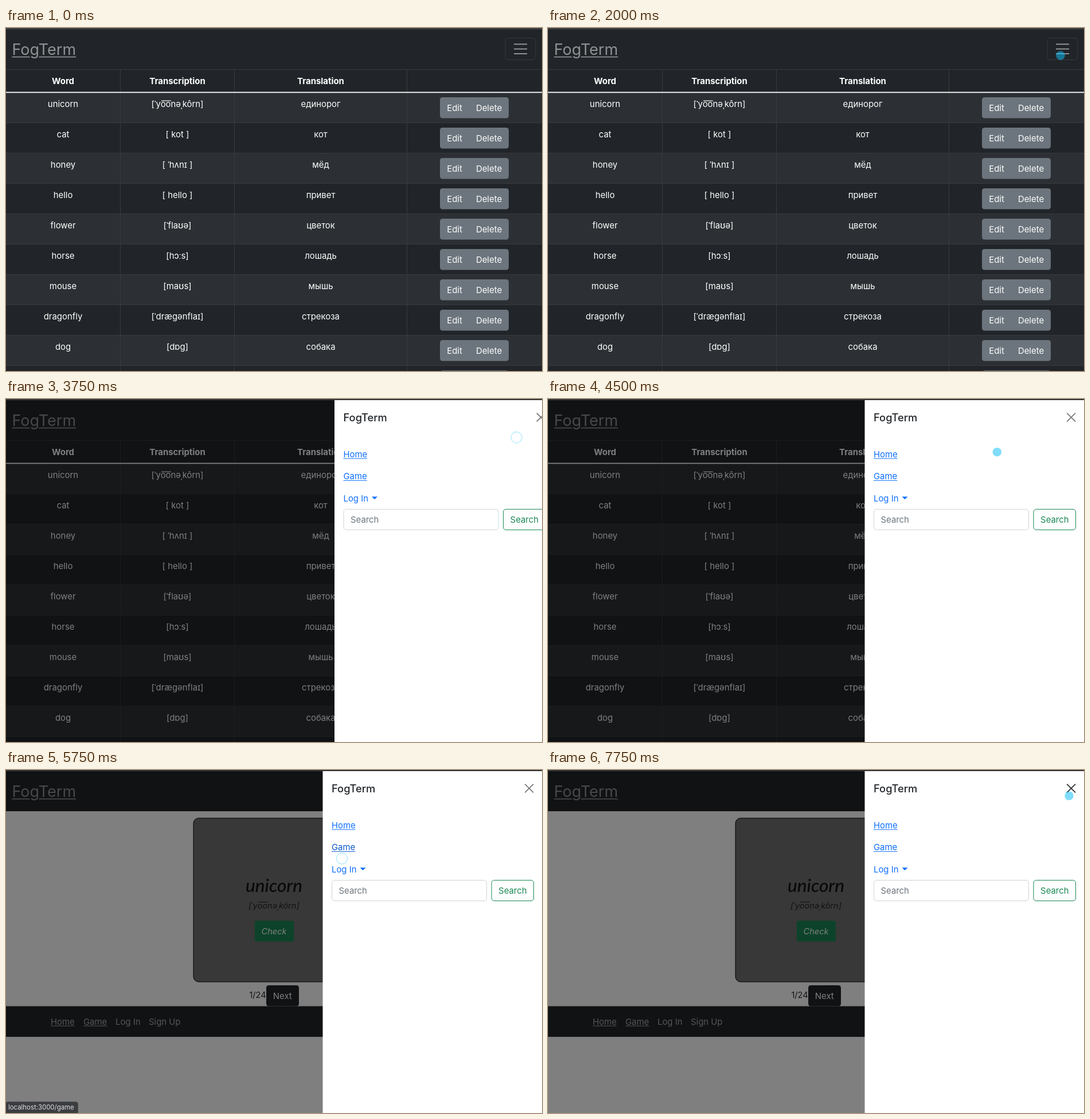
Write an HTML page with a canvas that moves like this. It is 935 px wide and 599 px high and loops after 8 s.

```html
<!DOCTYPE html>
<html lang="en">
<head>
<meta charset="utf-8">
<title>Word cards</title>
<style>
html, body { margin: 0; width: 100%; height: 100%; overflow: hidden; background: #212529; }
canvas { display: block; }
</style>
</head>
<body>
<canvas id="stage" width="935" height="599"></canvas>
<script>
const ctx = document.getElementById('stage').getContext('2d');
const W = 935, H = 599, LOOP = 8000, STEP = 250;
const SANS = 'Inter, "Noto Sans", "DejaVu Sans", sans-serif';
const BODY = '14.9px ' + SANS;
const BRAND = 'FogTerm';
const DARK = '#212529', LINE = '#373b3e', BLUE = '#0d6efd', GREEN = '#198754';
const DOT = 'rgba(13,190,247,.53)';
const PANEL_X = 552.5;

const words = [
  ['unicorn', '[ˈyoonəˌkôrn]', 'единорог'],
  ['cat', '[ kot ]', 'кот'],
  ['honey', '[ ˈhʌnɪ ]', 'мёд'],
  ['hello', '[ hello ]', 'привет'],
  ['flower', '[ˈflaʊə]', 'цветок'],
  ['horse', '[hɔːs]', 'лошадь'],
  ['mouse', '[maʊs]', 'мышь'],
  ['dragonfly', '[ˈdrægənflaɪ]', 'стрекоза'],
  ['dog', '[dɒg]', 'собака'],
  ['', '', '']
];
const centers = [99.5, 299, 549];

// Pointer path: time, x, y
const path = [
  [250, 848, 58], [750, 783, 211], [1000, 783, 180], [1250, 783, 180],
  [1750, 893, 44], [2000, 894, 48], [4000, 894, 48], [4250, 894, 64],
  [5000, 562, 150], [5250, 590, 135], [6500, 590, 135],
  [7500, 920, 42], [7750, 909, 45]
];
// Click rings: start, end, x, y, first opacity, last opacity
const rings = [
  [3250, 4250, 890.5, 67, .4, .12],
  [5750, 6500, 586, 154.5, .28, .1]
];

function rect(x, y, w, h, color) {
  ctx.fillStyle = color;
  ctx.fillRect(x, y, w, h);
}

function box(x, y, w, h, r, fill, stroke) {
  ctx.beginPath();
  ctx.roundRect(x, y, w, h, r);
  if (fill) { ctx.fillStyle = fill; ctx.fill(); }
  if (stroke) { ctx.strokeStyle = stroke; ctx.lineWidth = 1; ctx.stroke(); }
}

function text(s, x, y, color, font = BODY, align = 'left') {
  ctx.font = font;
  ctx.textAlign = align;
  ctx.fillStyle = color;
  ctx.fillText(s, x, y);
}

function link(s, x, y, color) {
  text(s, x, y, color);
  rect(x, y + 1.5, ctx.measureText(s).width, 1, color);
}

function strokePath(points, color, width) {
  ctx.beginPath();
  points.forEach(([x, y, move]) => move ? ctx.moveTo(x, y) : ctx.lineTo(x, y));
  ctx.strokeStyle = color;
  ctx.lineWidth = width;
  ctx.stroke();
}

// Transcription with the long bar over "oo"
function barred(s, x, y, color, font) {
  text(s, x, y, color, font, 'center');
  const at = s.indexOf('oo');
  if (at < 0) return;
  const left = x - ctx.measureText(s).width / 2 + ctx.measureText(s.slice(0, at)).width;
  rect(left + 1, y - 11.5, ctx.measureText('oo').width - 1, 1.2, color);
}

function navbar() {
  const color = '#8f9193';
  rect(0, 0, W, 72, DARK);
  ctx.font = '27px ' + SANS;
  ctx.textAlign = 'left';
  rect(10.5, 49.7, ctx.measureText(BRAND).width, 1.7, color);
  ctx.strokeStyle = DARK;
  ctx.lineWidth = 4;
  ctx.strokeText(BRAND, 10.5, 47);
  text(BRAND, 10.5, 47, color, ctx.font);
  box(871, 17.5, 53, 38, 5, null, LINE);
  for (const y of [28.3, 36.6, 44.9]) rect(886, y - .9, 23, 1.8, '#9b9d9f');
}

function tablePage() {
  rect(0, 0, W, H, DARK);
  navbar();
  rect(0, 72, W, 1, LINE);
  ['Word', 'Transcription', 'Translation'].forEach((s, i) =>
    text(s, centers[i], 98, '#fff', 'bold ' + BODY, 'center'));
  words.forEach((row, k) => {
    const y = 113 + 53 * k;
    if (k % 2 === 0) rect(0, y, W, 53, '#2c3034');
    rect(0, y + 52, W, 1, LINE);
    text(row[0], centers[0], y + 25, '#fff', BODY, 'center');
    barred(row[1], centers[1], y + 25, '#fff', BODY);
    text(row[2], centers[2], y + 25, '#fff', BODY, 'center');
    box(757, y + 8, 120, 36.5, 4.5, '#6c757d');
    text('Edit', 782.5, y + 32, '#fff', BODY, 'center');
    text('Delete', 842.5, y + 32, '#fff', BODY, 'center');
  });
  for (const x of [199, 398, 699]) rect(x, 72, 1, H, LINE);
  rect(0, 111.5, W, 1.8, '#fff');
}

function gamePage() {
  const soft = 'rgba(255,255,255,.62)';
  rect(0, 0, W, H, '#fff');
  navbar();
  box(327, 84, 281, 286, 9, '#707070', '#000');
  text('unicorn', 467.5, 213, '#111', 'italic 500 31.5px Lato, ' + SANS, 'center');
  barred(words[0][1], 467.5, 241.5, '#212529', 'italic 14.6px ' + SANS);
  box(434, 263.5, 68, 36, 2, GREEN);
  text('Check', 467.5, 287, '#fff', 'italic 14.6px ' + SANS, 'center');
  text('1/24', 453.5, 398, DARK, '14.5px ' + SANS, 'right');
  box(454, 376, 57, 36.5, 4.5, DARK);
  text('Next', 482.3, 400, '#fff', BODY, 'center');
  rect(0, 412.5, W, 53.5, DARK);
  link('Home', 78, 445, soft);
  link('Game', 135, 445, soft);
  text('Log In', 191, 445, soft);
  text('Sign Up', 249, 445, soft);
}

function panel(x, overGame, overClose) {
  ctx.save();
  ctx.translate(x - PANEL_X, 0);
  rect(PANEL_X, 2, 420, H, '#fff');
  text(BRAND, 568, 38.5, DARK, '500 18.3px ' + SANS);
  strokePath([[905.2, 24.6, 1], [920, 39.4], [920, 24.6, 1], [905.2, 39.4]],
    overClose ? '#333' : '#7c7c7c', 1.9);
  link('Home', 568, 102, BLUE);
  link('Game', 568, 140.3, overGame ? '#0a58ca' : BLUE);
  text('Log In', 568, 179, BLUE);
  ctx.beginPath();
  ctx.moveTo(617.5, 170.5);
  ctx.lineTo(627.5, 170.5);
  ctx.lineTo(622.5, 175.3);
  ctx.fillStyle = BLUE;
  ctx.fill();
  box(568.5, 192.5, 270, 36, 4.5, '#fff', '#ced4da');
  text('Search', 580.5, 216.3, '#6c757d');
  box(847, 192.5, 73.5, 36, 4.5, '#fff', GREEN);
  text('Search', 883.8, 216.3, GREEN, BODY, 'center');
  ctx.restore();
}

function statusBar() {
  box(-1, 579.5, 126.5, 22, 4, '#3b3d40', '#4a4c4f');
  text('localhost:3000/game', 4, 593.3, '#dcdee0', '11.4px ' + SANS);
}

function pointer(t) {
  const ring = rings.find(r => t >= r[0] && t < r[1]);
  ctx.beginPath();
  if (ring) {
    const [start, end, x, y, a, b] = ring;
    const alpha = a + (b - a) * (t - start) / (end - start);
    ctx.arc(x, y, 9.6, 0, Math.PI * 2);
    ctx.strokeStyle = `rgba(13,190,247,${alpha})`;
    ctx.lineWidth = 1.6;
    ctx.stroke();
    return;
  }
  if (t < path[0][0] || (t >= 6500 && t < 6750)) return;
  const next = path.findIndex(p => p[0] > t);
  const b = next < 0 ? path[path.length - 1] : path[next];
  const a = next < 0 ? b : path[next - 1];
  const f = a === b ? 0 : (t - a[0]) / (b[0] - a[0]);
  ctx.arc(a[1] + (b[1] - a[1]) * f, a[2] + (b[2] - a[2]) * f, 7.7, 0, Math.PI * 2);
  ctx.fillStyle = DOT;
  ctx.fill();
}

function draw(t) {
  const open = t >= 3750;
  const overGame = t >= 5500 && t < 6750;
  if (t < 5750) tablePage(); else gamePage();
  if (open) {
    rect(0, 0, W, H, 'rgba(0,0,0,.5)');
    panel(t < 4000 ? 573 : PANEL_X, overGame, t >= 7500);
  }
  rect(0, 0, W, 1, open ? '#26282a' : '#2b2e31');
  rect(0, 1, W, 1, open ? '#434547' : '#55595c');
  if (overGame) statusBar();
  pointer(t);
}

const began = performance.now();
function tick() {
  const t = (performance.now() - began) % LOOP;
  draw(Math.floor(t / STEP) * STEP);
  requestAnimationFrame(tick);
}
tick();
</script>
</body>
</html>
```
